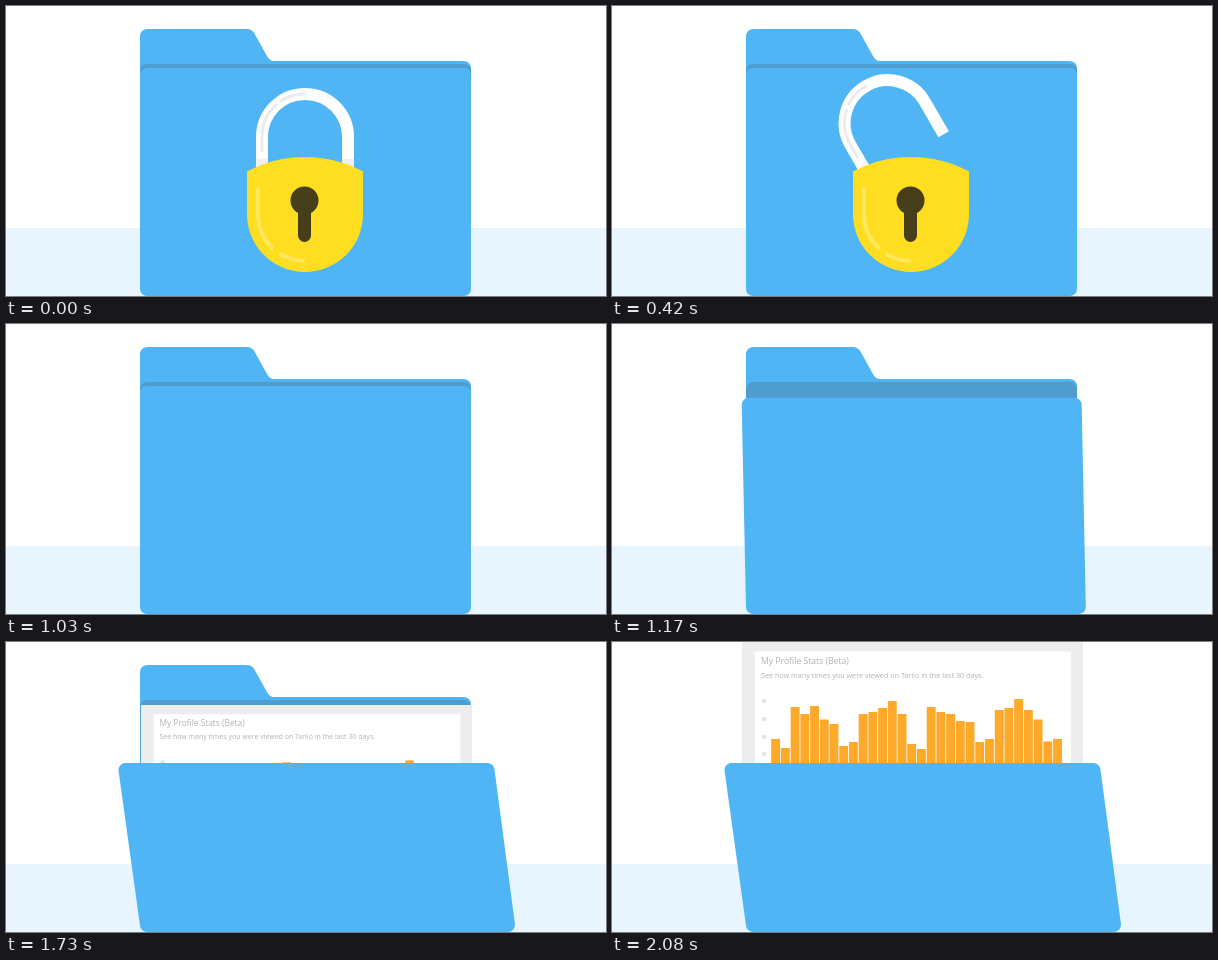
Animation, 600 px wide and 290 px high, one loop 5080 ms. Source, as an HTML page:

```html
<!DOCTYPE html>
<html lang="en">
<head>
<meta charset="utf-8">
<title>Folder unlock</title>
<style>
  html, body { margin: 0; width: 100%; height: 100%; overflow: hidden; background: #fff; }
  svg { display: block; }
  text { font-family: "Open Sans", sans-serif; fill: #b2b2b2; }
</style>
</head>
<body>
<svg width="600" height="290" viewBox="0 0 600 290">
  <rect y="222" width="600" height="68" fill="#e8f5fe"/>

  <path fill="#50b5f5" d="M134 282V31Q134 23 142 23H241Q246 23 248.500 27.500L261 50Q263.500 55 268 55H457Q465 55 465 63V282Z"/>
  <rect x="134" y="58" width="331" height="224" rx="7" fill="#4e9dce"/>

  <g id="card">
    <rect x="130" width="341" height="150" fill="#ededed"/>
    <rect x="143" y="9.500" width="316" height="138" fill="#fff"/>
    <text x="149" y="22" font-size="8.650">My Profile Stats (Beta)</text>
    <text x="149" y="35.500" font-size="7.220">See how many times you were viewed on Tarlio in the last 30 days.</text>
    <g id="dots" fill="#e4e4e4"></g>
    <g id="bars" fill="#ffa92b"></g>
  </g>

  <polygon id="front" fill="#50b5f5" stroke="#50b5f5" stroke-width="14" stroke-linejoin="round"/>

  <g id="lock" fill="none">
    <g id="shackle">
      <path stroke="#fff" stroke-width="12" d="M-43 37.500V0A43 43 0 0 1 43 0V37.500"/>
      <path id="shade" stroke="#f0f0f2" stroke-width="12" d="M-43 37.500V22M43 37.500V22"/>
      <path stroke="#ececee" stroke-width="3" stroke-linecap="round" d="M-43 14V0A43 43 0 0 1 -29 -32M-24 -36A43 43 0 0 1 0 -43"/>
    </g>
    <path fill="#ffde22" d="M241 165.500Q268 151 299 151T357 165.500V208A58 58 0 0 1 241 208Z"/>
    <path stroke="#ffe75e" stroke-width="4" stroke-linecap="round" d="M252 183V208A47 47 0 0 0 266 241.500M275 248.500A47 47 0 0 0 297 255"/>
    <circle cx="298.500" cy="194.500" r="14" fill="#473f1c"/>
    <path stroke="#473f1c" stroke-width="13" stroke-linecap="round" d="M298.500 200V229.500"/>
  </g>
</svg>
<script>
const LOOP = 5080, STEP = 70, STEPS = 10;
const UNLOCK = 0, OPEN = 1030, RISE = 1380;
const barTops = [97, 106, 65, 72, 64, 77.5, 82, 104, 100, 72, 70, 66, 59, 72, 102,
                 107, 65, 70, 72, 79, 80, 100, 97, 68, 66, 57, 68, 77.5, 99.5, 97];
const $ = id => document.getElementById(id);
const set = (id, name, value) => $(id).setAttribute(name, value);
const show = (id, on) => set(id, "display", on ? "inline" : "none");
const mix = (a, b, p) => a + (b - a) * p;

$("bars").innerHTML = barTops.map((y, i) =>
  `<rect x="${159.2 + i * 9.72}" y="${y}" width="8.9" height="${140 - y}"/>`).join("");
$("dots").innerHTML = [59, 77, 95, 112].map(y =>
  `<circle cx="152.3" cy="${y}" r="2.3"/>`).join("");

// Progress 0..1 of a tween that advances in discrete steps
const progress = (t, start) =>
  Math.max(0, Math.min(STEPS, Math.floor((t - start) / STEP))) / STEPS;

function draw(t) {
  const u = progress(t, UNLOCK), o = progress(t, OPEN), r = progress(t, RISE);

  show("lock", t < OPEN);
  set("shackle", "transform",
    `translate(${mix(299, 260, u)} ${mix(131, 108, u)}) rotate(${-50 * u})`);
  set("shade", "opacity", 1 - u);

  const top = mix(69, 128, o);
  set("front", "points", [
    mix(141, 119.5, o), top,
    mix(458, 481.5, o), top,
    mix(458, 502, o), 283,
    141, 283
  ].join(" "));

  show("card", t >= RISE);
  set("card", "transform",
    `translate(300.5 ${mix(126, 0, r)}) scale(${mix(0.942, 1, r)}) translate(-300.5 0)`);
}

const begin = performance.now();
function tick() {
  draw((performance.now() - begin) % LOOP);
  requestAnimationFrame(tick);
}
tick();
</script>
</body>
</html>
```
